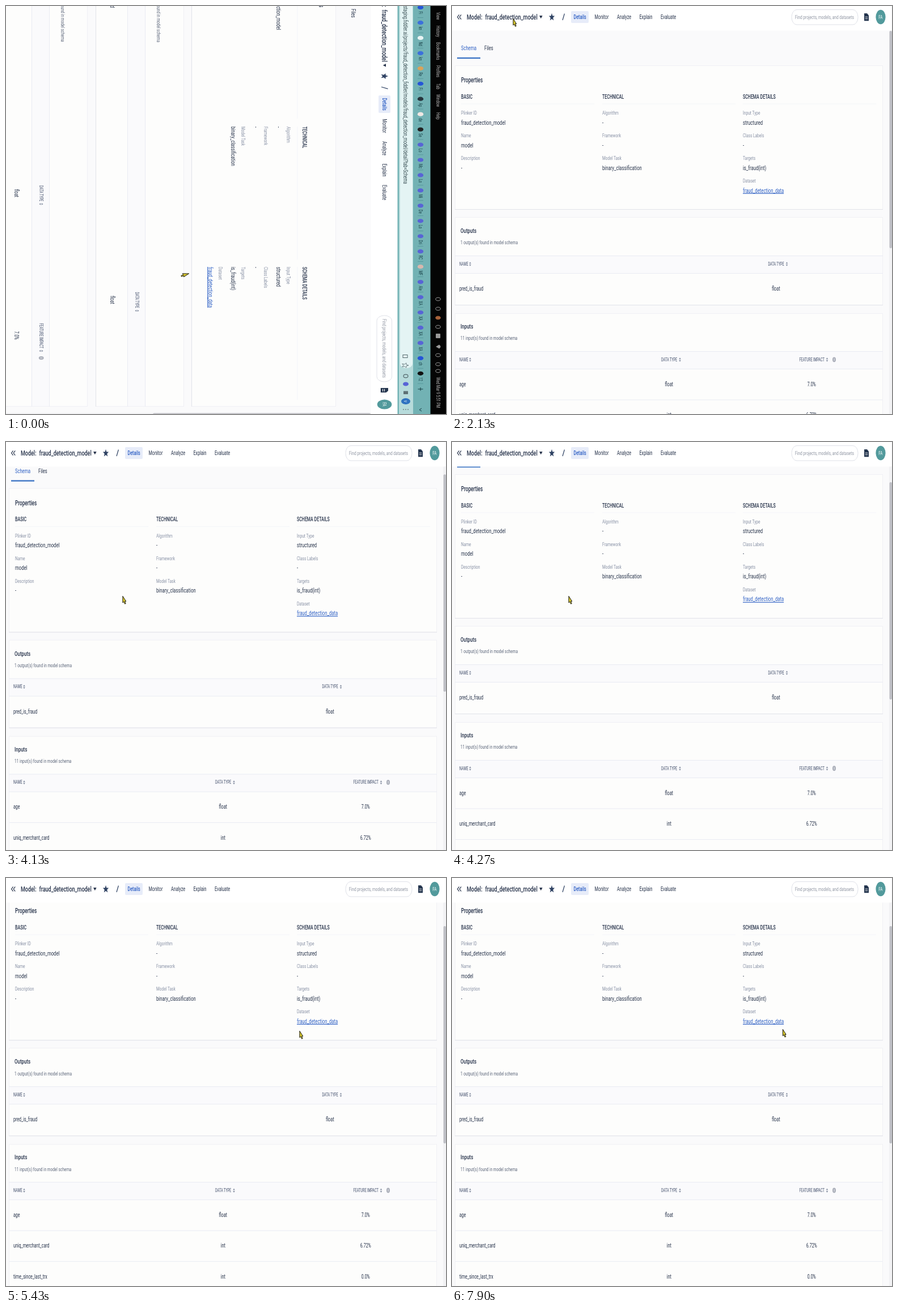
Animation, 776 px wide and 721 px high, one loop 8 s. Source, as an HTML page:

```html
<!DOCTYPE html>
<html lang="en">
<head>
<meta charset="utf-8">
<title>Model details</title>
<style>
html, body { margin: 0; width: 100%; height: 100%; overflow: hidden; background: #000; }
svg { display: block; width: 776px; height: 721px; }
text { font-family: Roboto, "Liberation Sans", sans-serif; white-space: pre; }
</style>
</head>
<body>
<svg id="stage" viewBox="0 0 776 721" xmlns="http://www.w3.org/2000/svg"></svg>
<script>
const LOOP = 8000;
const SX = 0.642, SY = 0.95;
const INK = '#26324a', SOFT = '#8992a6', BLUE = '#2d5fc4', LINE = '#e9ebf3';

// y is the vertical middle of the capitals
function text(x, y, str, size = 12, fill = INK, weight = 400, extra = '') {
  return `<text transform="translate(${x} ${y + size * 0.335}) scale(${SX} ${SY})" ` +
    `font-size="${size}" fill="${fill}" font-weight="${weight}" ${extra}>${str}</text>`;
}
const rect = (x, y, w, h, fill, extra = '') =>
  `<rect x="${x}" y="${y}" width="${w}" height="${h}" fill="${fill}" ${extra}/>`;
const dot = (x, y, rx, ry, fill, extra = '') =>
  `<ellipse cx="${x}" cy="${y}" rx="${rx}" ry="${ry}" fill="${fill}" ${extra}/>`;
const path = (d, fill, extra = '') => `<path d="${d}" fill="${fill}" ${extra}/>`;
const hline = (x, y, w, color = LINE) => rect(x, y, w, 1, color);
const outline = (color, width = 1) => `stroke="${color}" stroke-width="${width}"`;

function card(y, h) {
  return rect(5.5, y + 0.5, 754, h, '#fdfdfc', outline('#f0f0f5')) +
    hline(5, y + h, 755, '#e2e3e9');
}

function column(x, title, fields) {
  let out = text(x, 160, title, 11, INK, 500) + hline(x, 172.5, 235, '#f4f5f9');
  fields.forEach(([label, value], i) => {
    const y = 188.5 + i * 40;
    const link = label === 'Dataset';
    out += text(x, y, label, 10.3, SOFT) +
      text(x, y + 17, value, 12, link ? BLUE : INK, 400, link ? 'text-decoration="underline"' : '');
  });
  return out;
}

function heads(y, list) {
  let out = rect(6, y - 15, 753, 31, '#fafafc') + hline(5, y - 15, 755) + hline(5, y + 16, 755);
  for (const [x, label, sortX] of list) {
    out += text(x, y, label, 8.6, '#667087', 500) +
      path(`M${sortX - 1.8} ${y - 0.7}l1.8-3 1.8 3zm0 1.4l1.8 3 1.8-3z`, '#8790a2');
  }
  return out;
}

function pageBody() {
  let out = text(16, 74, 'Schema', 11.7, BLUE) + text(57, 74, 'Files', 11.7) +
    rect(9, 90.8, 41, 2.4, '#3f76c5');

  out += card(105, 254) + text(16, 131, 'Properties', 12.8, INK, 500) +
    column(16, 'BASIC', [['Plinker ID', 'fraud_detection_model'], ['Name', 'model'], ['Description', '-']]) +
    column(265, 'TECHNICAL', [['Algorithm', '-'], ['Framework', '-'], ['Model Task', 'binary_classification']]) +
    column(513, 'SCHEMA DETAILS', [['Input Type', 'structured'], ['Class Labels', '-'],
      ['Targets', 'is_fraud(int)'], ['Dataset', 'fraud_detection_data']]);

  out += card(373, 155) + text(15, 397, 'Outputs', 12.4, INK, 500) +
    text(15, 418, '1 output(s) found in model schema', 10.1, '#5c667a') +
    heads(456, [[13, 'NAME', 32], [557.5, 'DATA TYPE', 590.5]]) +
    text(13, 499.5, 'pred_is_fraud', 11) + text(564, 499.5, 'float', 11.3);

  out += card(543, 460) + text(15, 566, 'Inputs', 12.4, INK, 500) +
    text(15, 587, '11 input(s) found in model schema', 10.1, '#5c667a') +
    heads(625, [[13, 'NAME', 32], [369, 'DATA TYPE', 402], [612.5, 'FEATURE IMPACT', 661.5]]) +
    dot(674, 624.8, 3, 4.4, '#a9adb8') + rect(673.5, 622.5, 1, 4.6, '#eef0f4');
  [['age', 'float', '7.0%'], ['uniq_merchant_card', 'int', '6.72%'], ['time_since_last_trx', 'int', '0.0%']]
    .forEach(([name, type, impact], i) => {
      const y = 668 + i * 54.5, mid = 'text-anchor="middle"';
      out += text(13, y, name, 11) + text(382.7, y, type, 11.3, INK, 400, mid) +
        text(634.3, y, impact, 11, INK, 400, mid) + hline(6, y + 27.5, 753);
    });
  return out;
}

function header() {
  let out = rect(-320, -8, 1094, 51.5, '#fff') +
    path('M12.6 15.3l-3 4.2 3 4.2m3.6-8.4l-3 4.2 3 4.2', 'none', outline(INK, 1.2)) +
    text(26, 19.5, 'Model:', 14, INK, 500) + text(58.5, 19.5, 'fraud_detection_model', 14, INK, 500) +
    path('M154 17h5.6l-2.8 5.2z', INK);
  let star = '';
  for (let i = 0; i < 10; i++) {
    const a = i * Math.PI / 5, r = i % 2 ? 0.43 : 1;
    star += `${i ? 'L' : 'M'}${(176 + Math.sin(a) * r * 5.4).toFixed(1)} ${(19.8 - Math.cos(a) * r * 7).toFixed(1)}`;
  }
  out += path(star + 'z', '#2f4263') + path('M195 25l3.4-11.5', 'none', outline('#2f4263', 1.2)) +
    rect(210, 9, 31, 21, '#e7ecf9', 'rx="2"');
  [[214.5, 'Details'], [251.5, 'Monitor'], [291, 'Analyze'], [330.5, 'Explain'], [368, 'Evaluate']]
    .forEach(([x, label], i) => out += text(x, 19.5, label, 11.2, i ? INK : BLUE, i ? 400 : 500));
  out += rect(599, 6.5, 117, 26.5, '#fff', 'rx="9" ry="13" ' + outline('#dfe1e8')) +
    text(605, 19.5, 'Find projects, models, and datasets', 10.3, '#9096a3') +
    path('M727 13h5l3 3.6v9.6h-8z', '#25364f') +
    path('M728.8 19.5h4.4m-4.4 3h4.4', 'none', outline('#fff', 1.1)) +
    dot(756, 19.5, 8.6, 12.8, '#529a9c') + text(752.2, 19.7, 'FA', 10, '#fff');
  return out;
}

function browser() {
  let out = rect(-320, -89, 1094, 28, '#050505') + rect(-320, -61.5, 1094, 31.5, '#72b2b4') +
    rect(-320, -31, 1094, 27, '#b7dbdb') + rect(-120, -30, 812, 22, '#e4f4f4', 'rx="8" ry="11"') +
    rect(-320, -6, 1094, 2.5, '#72b2b4');
  [[63, 'View'], [87, 'History'], [116, 'Bookmarks'], [157, 'Profiles'], [189, 'Tab'], [208, 'Window'],
    [240, 'Help'], [708, 'Wed Mar 9 5:51 PM']]
    .forEach(([x, label]) => out += text(x, -75, label, 9.7, '#b9b9b9'));
  [570, 587, 603, 619, 635, 654, 669, 685, 697].forEach((x, i) => {
    out += i === 4 ? rect(x - 4, -79, 8, 8, '#999', 'rx="1"')
      : i === 5 ? path(`M${x - 3.5} -77q3.5-5 7 0l-3.5 6z`, '#999')
      : dot(x, -75, 2.8, 4.2, i === 2 ? '#a8623a' : 'none', outline(i === 2 ? '#a8623a' : '#999'));
  });
  const tabs = 'Fi kn Nd kn Re Fi Ap de Se Lo Mc Lo Mi De Lo Dri RC MF Ale XA XA XA XA ch 12'.split(' ');
  const tint = { Fi: '#2555d8', kn: '#3c70dc', Nd: '#e9f4f4', Re: '#d9a35a', Ap: '#26343c', de: '#f0e8e4',
    Se: '#222', MF: '#d8b8ae', ch: '#2555d8', 12: '#111' };
  tabs.forEach((label, i) => {
    const x = 54.5 + i * 26.95;
    out += dot(x, -44, 3.6, 5.2, tint[label] || '#5864d6') + text(x + 7, -44, label, 9, '#173f45') +
      rect(x + 17.5, -49, 0.7, 10, '#4c8f94');
  });
  out += path('M726-44h6m-3-4.5v9', 'none', outline('#173f45')) +
    path('M763-46l2.5 4 2.5-4', 'none', outline('#173f45')) +
    text(52, -17.5, 'staging.fiddler.ai/projects/fraud_detection_fiddler/models/fraud_detection_model/detail?tab=Schema', 10.85, '#344b50') +
    rect(668.5, -21, 5, 8, 'none', outline('#55686c')) +
    path('M687-23l1.2 4h3l-2.4 3 1 4.3-2.8-2.5-2.8 2.5 1-4.3-2.4-3h3z', 'none', outline('#55686c', 0.8)) +
    dot(706, -18, 2.8, 4, 'none', outline('#55686c', 1.2)) + dot(720, -18, 3.6, 5, '#5864d6') +
    rect(732.5, -22, 5.5, 8, '#5d7074') + dot(750.5, -18, 5.4, 8, '#2f72c0') + text(748.8, -18, 'V', 8.5, '#fff');
  for (const y of [-22, -18, -14]) out += dot(765, y, 0.8, 1, '#55686c');
  return out;
}

const stage = document.getElementById('stage');
stage.innerHTML = `<rect width="776" height="721" fill="#000"/>
<g id="screen">
  ${rect(-320, -6, 1096, 1000, '#fafafb')}
  <g id="body">${pageBody()}</g>
  ${rect(771, 43, 5, 951, '#f2f2f4')}
  <rect id="thumb" x="771.5" width="4.5" height="384" rx="2" fill="#bfc0c6"/>
  ${header()}${browser()}
  <g id="cursor">${path('M.4 .4V12l1.9-1.8 1.8 4 1.6-.8-1.7-3.9h2.2z', '#d9c92e', outline('#1b1a12') + ' stroke-linejoin="round"')}</g>
</g>`;
const [screenEl, bodyEl, thumbEl, cursorEl] =
  ['screen', 'body', 'thumb', 'cursor'].map(id => document.getElementById(id));

const ease = p => p * p * (3 - 2 * p);
const span = (t, a, b) => ease(Math.min(1, Math.max(0, (t - a) / (b - a))));

// time, x, y of the pointer
const stops = [
  [30, 524.5, 364], [370, 378, 131], [930, 378, 131], [1680, 98, 22.5], [1870, 98, 22.5], [2130, 107.5, 22],
  [2400, 120, 22.5], [3230, 205.5, 272], [4600, 205.5, 272], [5200, 479, 293], [5430, 517.5, 270],
  [5670, 515, 261], [5970, 515, 261], [6800, 573, 265], [7630, 573, 271], [7870, 583, 267]
];

function pointer(t) {
  const i = stops.findIndex(s => s[0] > t);
  if (i === 0) return stops[0].slice(1);
  if (i < 0) return stops[stops.length - 1].slice(1);
  const a = stops[i - 1], b = stops[i], p = span(t, a[0], b[0]);
  return [a[1] + (b[1] - a[1]) * p, a[2] + (b[2] - a[2]) * p];
}

function draw(t) {
  const angle = 90 * (1 - span(t, 15, 370));
  const scroll = 72.8 * span(t, 3900, 4510);
  const [x, y] = pointer(t);
  screenEl.setAttribute('transform', `rotate(${angle} 369.5 317.5)`);
  bodyEl.setAttribute('transform', `translate(0 ${-scroll})`);
  thumbEl.setAttribute('y', 44 + scroll * 0.563);
  cursorEl.setAttribute('transform', `translate(${x} ${y})`);
}

const start = performance.now();
function tick() {
  draw((performance.now() - start) % LOOP);
  requestAnimationFrame(tick);
}
draw(0);
requestAnimationFrame(tick);
</script>
</body>
</html>
```
